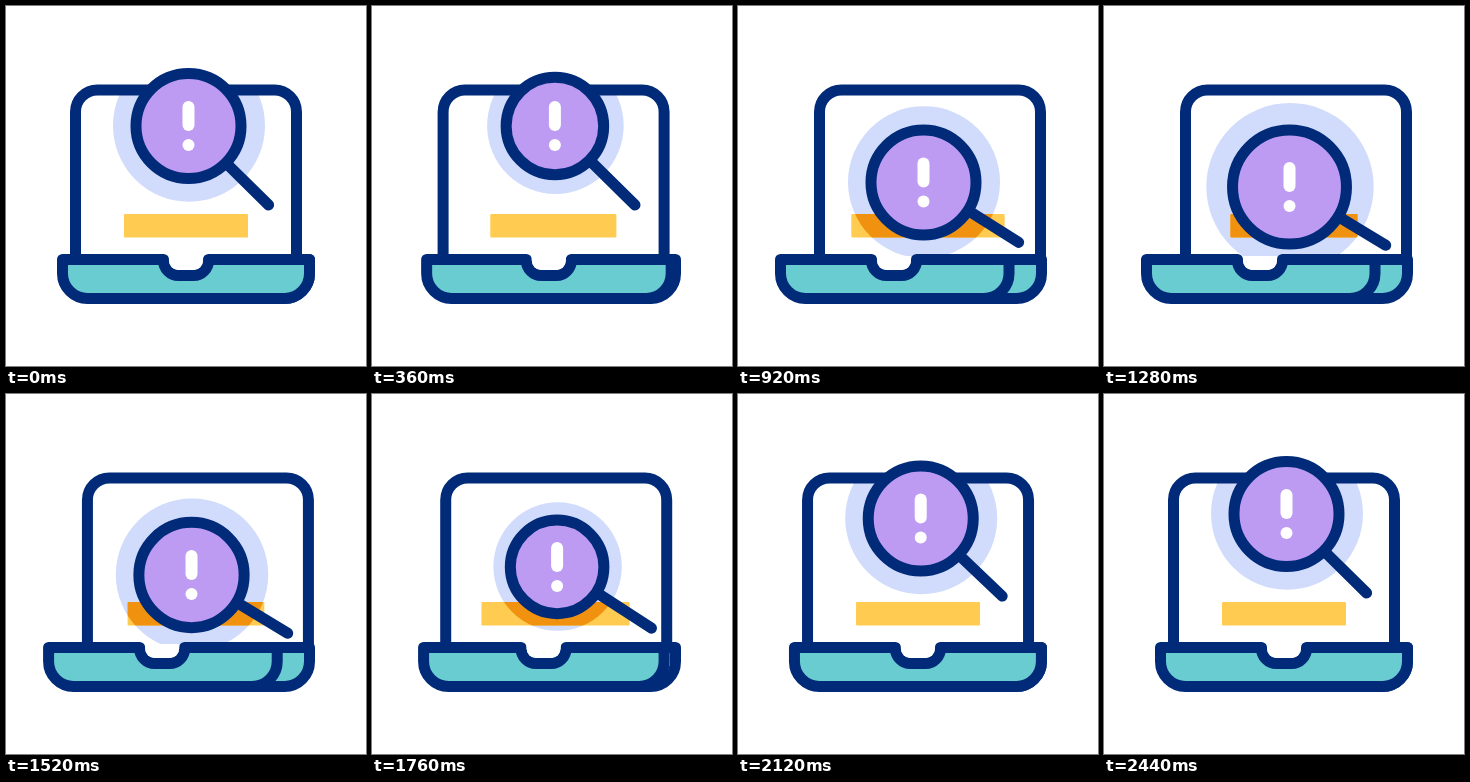
These frames come from a looping animation (360 px wide and 360 px high, 2.64 s). An HTML page:

```html
<!DOCTYPE html>
<html lang="en">
<head>
<meta charset="utf-8">
<title>Laptop inspection icon</title>
<style>
  html, body { margin: 0; width: 100%; height: 100%; overflow: hidden; background: #fff; }
  svg { display: block; width: 100vw; height: 100vh; }
  .line { stroke: #012a78; stroke-width: 11; stroke-linecap: round; stroke-linejoin: round; }
</style>
</head>
<body>
<svg viewBox="0 0 360 360">
  <defs>
    <clipPath id="inside"><rect id="pane" y="84" width="221" height="168" rx="22"/></clipPath>
    <clipPath id="glow"><circle id="glowShape"/></clipPath>
  </defs>
  <g clip-path="url(#inside)"><circle id="halo" fill="#d1dcfc"/></g>
  <rect id="bar" y="208" height="23.5" rx="1" fill="#ffcb50"/>
  <g clip-path="url(#glow)"><rect id="barHot" y="208" height="23.5" rx="1" fill="#f09210"/></g>
  <path id="screen" class="line" fill="none" d="M69.5 253.5V106a22 22 0 0 1 22-22H268.5a22 22 0 0 1 22 22V253.5"/>
  <path class="line" fill="#68ccd0" d="M230 253.5H303.5V267.5a25 25 0 0 1-25 25H200"/>
  <path id="front" class="line" fill="#68ccd0"/>
  <path id="notch" fill="#fff"/>
  <g id="lens">
    <path id="handle" class="line"/>
    <circle id="ring" class="line" fill="#bd9bf3"/>
    <path d="M0-19V-1" stroke="#fff" stroke-width="12" stroke-linecap="round"/>
    <circle cy="19" r="6" fill="#fff"/>
  </g>
</svg>
<script>
const LOOP = 2640, SPAN = 660;
const $ = id => document.getElementById(id);
const set = (id, attrs) => {
  for (const k in attrs) $(id).setAttribute(k, attrs[k]);
};
const clamp = u => Math.min(1, Math.max(0, u));

// cubic-bezier(.25, .1, .25, 1)
function ease(u) {
  u = clamp(u);
  if (u === 0 || u === 1) return u;
  let lo = 0, hi = 1, s = 0.5;
  for (let i = 0; i < 24; i++) {
    s = (lo + hi) / 2;
    const x = 0.75 * s * (1 - s) + s * s * s;
    if (x < u) lo = s; else hi = s;
  }
  return 0.3 * s * (1 - s) * (1 - s) + 3 * s * s * (1 - s) + s * s * s;
}

const there = (t, out, back) => ease((t - out) / SPAN) - ease((t - back) / SPAN);

function track(keys, t) {
  let [t0, v0] = keys[0];
  for (const [t1, v1] of keys) {
    if (t < t1) {
      const u = clamp((t - t0) / (t1 - t0));
      return v0 + (v1 - v0) * u * u * (3 - 2 * u);
    }
    t0 = t1;
    v0 = v1;
  }
  return v0;
}

const PULSE = [[0, 0], [200, 1], [420, -1], [640, 0], [1120, 0], [1310, 1], [1740, -1], [2040, 0]];
const WIDTH = [[280, 124], [780, 154], [900, 153.5], [1340, 126], [1720, 149], [2080, 124]];

function draw(t) {
  const turn = there(t, 280, 1512);
  const drop = there(t, 480, 1680);
  const pulse = track(PULSE, t);
  const grow = (up, down) => 1 + pulse * (pulse > 0 ? up : down);

  // laptop
  const left = 56.5 - 14 * turn, right = 303.5 - 32.5 * turn, n = 157.5 - 24 * turn;
  set("screen", { transform: `translate(${12 * turn} 0)` });
  set("pane", { x: 69.5 + 12 * turn });
  set("front", { d: `M${left} 253.5H${n}v1a15 15 0 0 0 15 15h15a15 15 0 0 0 15-15v-1H${right}` +
    `V267.5a25 25 0 0 1-25 25H${left + 25}a25 25 0 0 1-25-25Z` });
  set("notch", { d: `M${n + 5.5} 250v4.5a9.5 9.5 0 0 0 9.5 9.5h15a9.5 9.5 0 0 0 9.5-9.5v-4.5Z` });

  // magnifier
  const cx = 182.5 + 3 * Math.max(turn, drop), cy = 120 + 61 * drop;
  const r = 58 * grow(0.082, 0.1) - 5.5;
  const a = (44.6 - 13.4 * drop) * Math.PI / 180;
  const at = d => `${d * Math.cos(a)} ${d * Math.sin(a)}`;
  set("lens", { transform: `translate(${cx} ${cy})` });
  set("ring", { r });
  set("handle", { d: `M${at(r)}L${at(112.5)}` });
  const glow = { cx: cx + 0.5, cy: cy - 0.3, r: 76 * grow(0.108, 0.157) };
  set("halo", glow);
  set("glowShape", glow);

  // text bar
  const width = track(WIDTH, t);
  const bar = { x: 180 + 10 * turn - width / 2, width };
  set("bar", bar);
  set("barHot", bar);
}

const start = performance.now();
function tick() {
  draw((performance.now() - start) % LOOP);
  requestAnimationFrame(tick);
}
tick();
</script>
</body>
</html>
```
